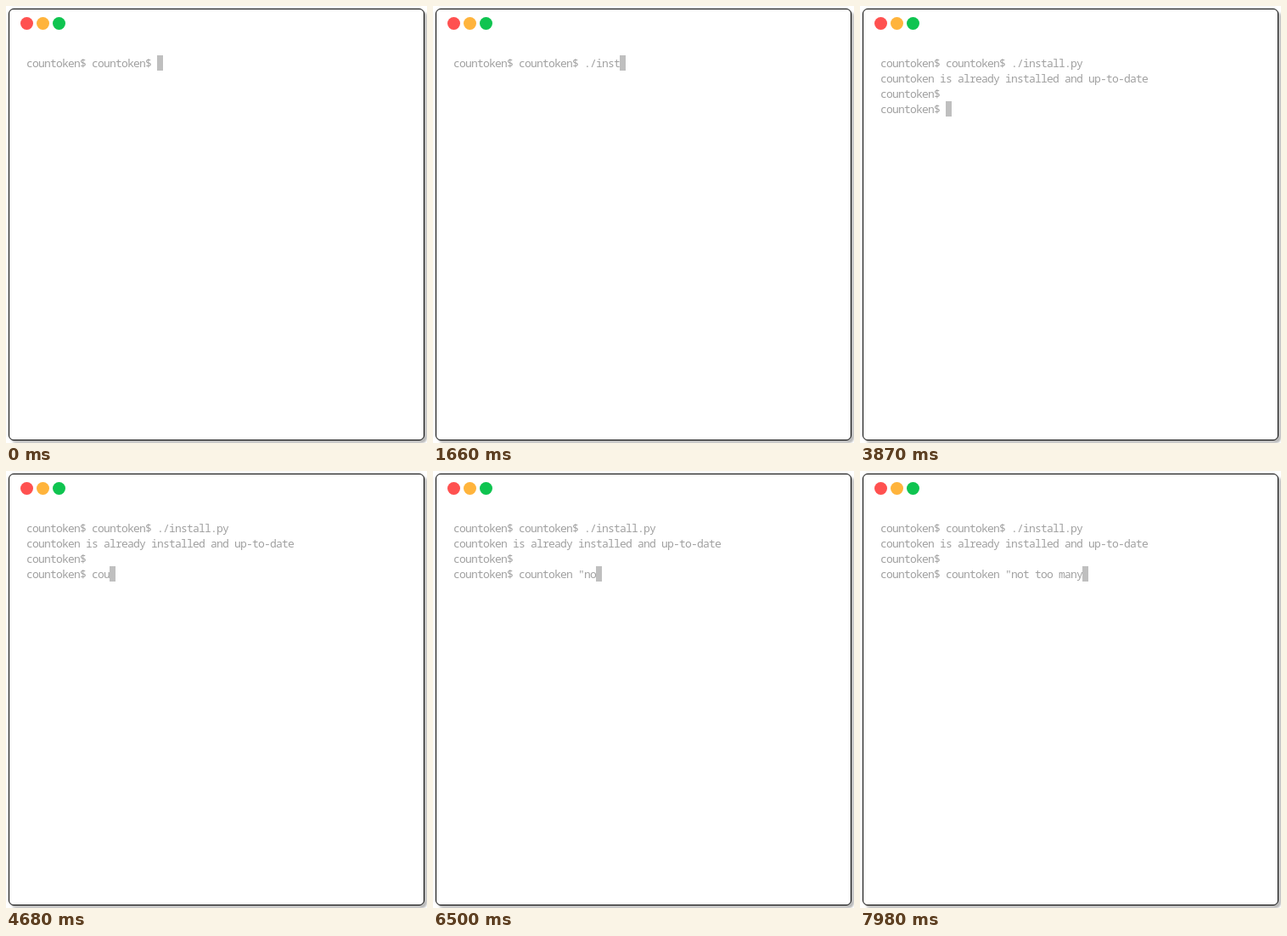
Animation, 496 px wide and 514 px high, one loop 8000 ms. Source, as an HTML page:

```html
<!DOCTYPE html>
<html lang="en">
<head>
<meta charset="utf-8">
<title>Terminal session</title>
<style>
html, body { margin: 0; width: 100%; height: 100%; overflow: hidden; background: #fff; }
.window {
  position: absolute; left: 3px; top: 3px; width: 490px; height: 508px;
  box-sizing: border-box; border: 1px solid #000; border-radius: 6px;
  background: #fff; box-shadow: 3px 3px 2px #bbb;
}
.dot { position: absolute; top: 13px; width: 15px; height: 15px; border-radius: 50%; }
pre {
  position: absolute; left: 24px; top: 58px; margin: 0; color: #a0a0a0;
  font: 13px/18px "Noto Sans Mono", "DejaVu Sans Mono", monospace;
  letter-spacing: -0.8px;
}
#cursor { position: absolute; width: 7px; height: 18px; background: #bfbfbf; }
</style>
</head>
<body>
<div class="window"></div>
<div class="dot" style="left:17px;background:#ff5150"></div>
<div class="dot" style="left:36px;background:#ffb43c"></div>
<div class="dot" style="left:55px;background:#0fc450"></div>
<div id="cursor"></div>
<pre id="screen"></pre>
<script>
const LOOP = 8000, COL = 7, ROW = 18, LEFT = 24, TOP = 58;
const PROMPT = "countoken$ ";
const screen = document.getElementById("screen");
const cursor = document.getElementById("cursor");

// Each event appends text at a time in ms.
const events = [[0, PROMPT + PROMPT]];
const add = (time, text) => events.push([time, text]);
const type = (start, step, text) => [...text].forEach((c, i) => add(start + i * step, c));

type(1160, 100, "./inst");
add(1810, "all.py ");
add(2430, "\n");
add(2740, "countoken is already installed and up-to-date\n");
add(2840, PROMPT);
add(3870, "\n" + PROMPT);
type(4480, 100, "counto");
add(5130, "ken ");
const keyTimes = [6010, 6360, 6500, 6630, 6770, 6890, 7010, 7170, 7310, 7490, 7640, 7780, 7980];
[...'"not too many'].forEach((c, i) => add(keyTimes[i], c));

let shown = null;
function draw() {
  const t = performance.now() % LOOP;
  const text = events.filter(e => e[0] <= t).map(e => e[1]).join("");
  if (text !== shown) {
    shown = text;
    screen.textContent = text;
    const lines = text.split("\n");
    cursor.style.left = LEFT + lines.at(-1).length * COL + "px";
    cursor.style.top = TOP + (lines.length - 1) * ROW + "px";
  }
  requestAnimationFrame(draw);
}
draw();
</script>
</body>
</html>
```
